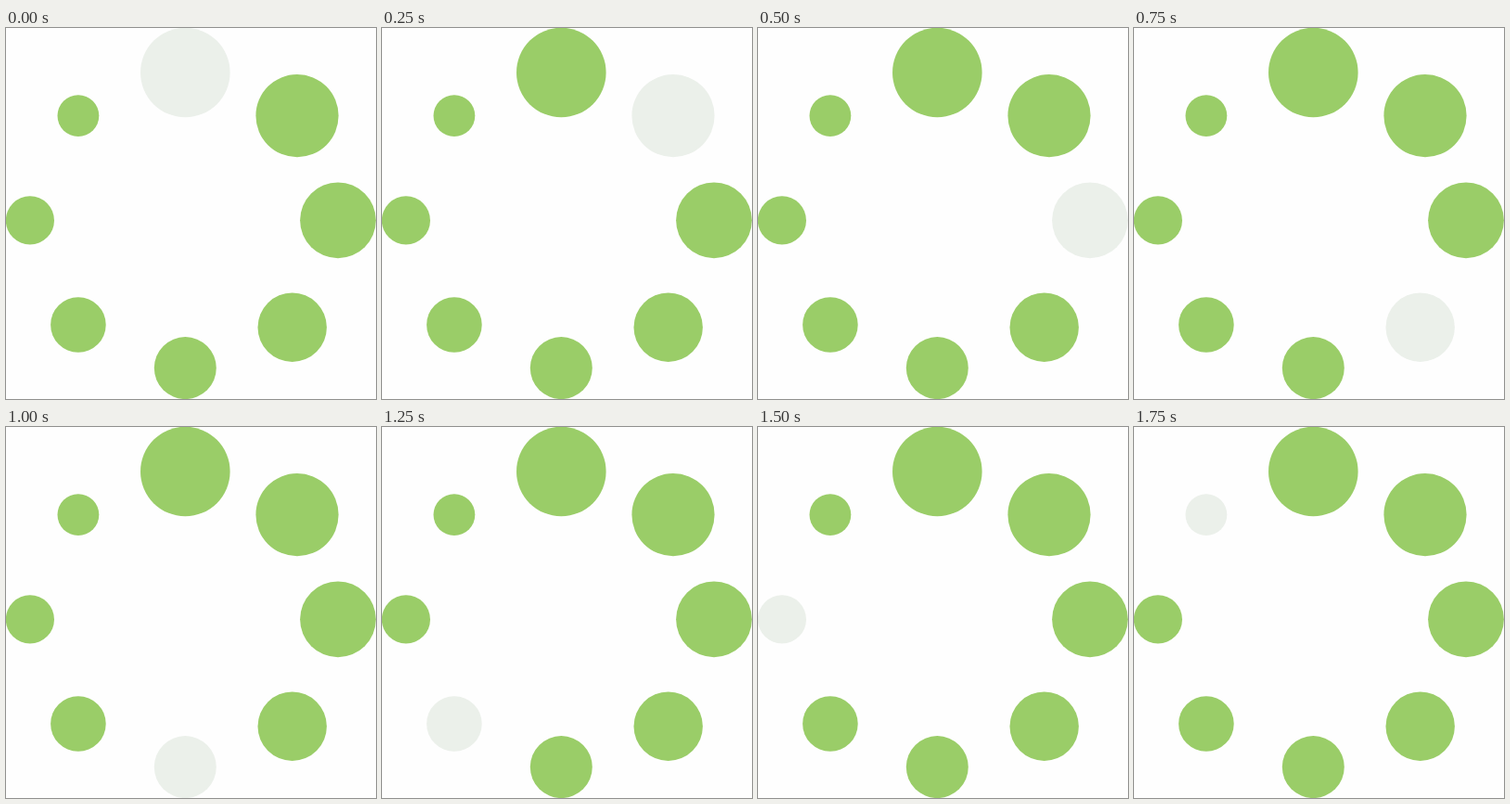
Recreate the animation shown at these times as an HTML page. Size 399 px wide and 400 px high, loop 2000 ms.

```html
<!DOCTYPE html>
<html lang="en">
<head>
<meta charset="utf-8">
<title>Loading dots</title>
<style>
  html, body { margin: 0; width: 100%; height: 100%; overflow: hidden; background: #fefefe; }
  svg { display: block; width: 399px; height: 400px; }
</style>
</head>
<body>
<svg id="stage" viewBox="0 0 399 400"></svg>
<script>
const GREEN = '#9acd68';
const PALE = '#ebf0ea';
const LOOP = 2000;

// x, y, radius, clockwise from the top
const dots = [
  [193.3, 48, 48.3],
  [314, 94.6, 44.6],
  [358, 207.3, 40.9],
  [308.7, 322.7, 37.2],
  [193.3, 366.6, 33.5],
  [77.9, 320, 29.8],
  [25.9, 207.4, 26.1],
  [77.9, 94.6, 22.4]
];

const stage = document.getElementById('stage');
const circles = dots.map(([cx, cy, r]) => {
  const circle = document.createElementNS('http://www.w3.org/2000/svg', 'circle');
  Object.entries({ cx, cy, r, fill: GREEN }).forEach(([k, v]) => circle.setAttribute(k, v));
  return stage.appendChild(circle);
});

// One dot at a time turns pale, with hard switches
const start = performance.now();
function draw(now) {
  const time = Math.max(0, now - start) % LOOP;
  const active = Math.floor(time / LOOP * dots.length);
  circles.forEach((c, i) => c.setAttribute('fill', i === active ? PALE : GREEN));
  requestAnimationFrame(draw);
}
draw(start);
</script>
</body>
</html>
```
